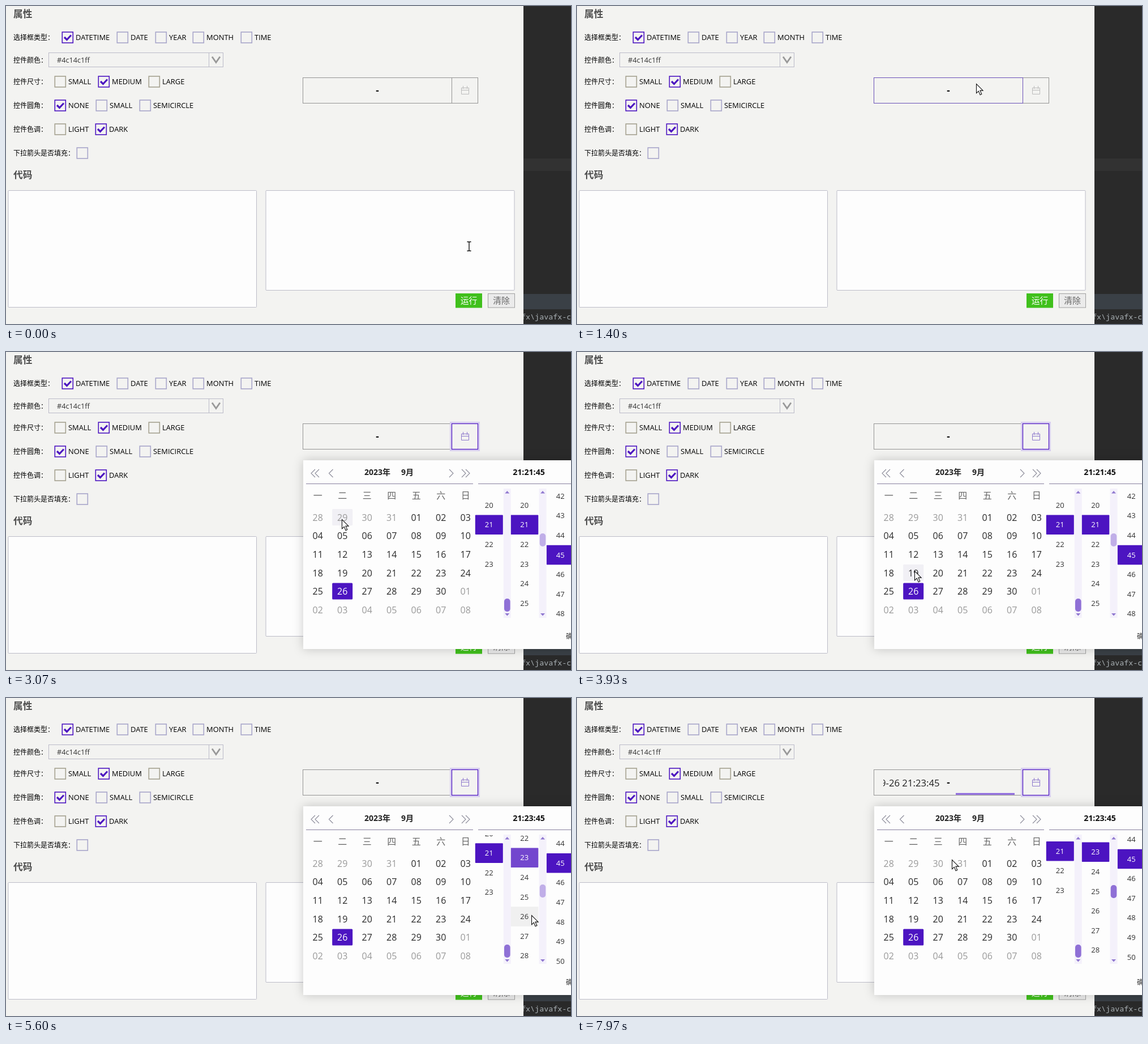
An HTML page that plays this animation: 998x561 px, repeating every 8000 ms.

```html
<!DOCTYPE html>
<html lang="zh-CN">
<head>
<meta charset="utf-8">
<style>
html, body { margin: 0; height: 100%; overflow: hidden; background: #f3f3f1 }
svg { display: block; width: 100%; height: 100% }
text { font-family: "Open Sans", "Noto Sans CJK SC", "Noto Sans CJK", sans-serif; white-space: pre }
.mono { font-family: "Noto Sans Mono", monospace }
.line { fill: none; stroke-linejoin: miter }
#shadow { filter: drop-shadow(0 0 9px #0003) }
</style>
</head>
<body>
<svg id="stage" viewBox="0 0 998 561"></svg>
<script>
const PURPLE = '#4c14c1', LAVENDER = '#a8a6ca', OLIVE = '#a5a290', ROW = 34.6;

const rect = (x, y, w, h, fill, more = '') =>
  `<rect x="${x}" y="${y}" width="${w}" height="${h}" fill="${fill}" ${more}/>`;
const box = (x, y, w, h, stroke, width = 1, more = '') =>
  rect(x, y, w, h, 'none', `stroke="${stroke}" stroke-width="${width}" ${more}`);
// y is the visual middle of the line
const text = (x, y, s, size, fill = '#000', more = '') =>
  `<text x="${x}" y="${y + size * .36}" font-size="${size}" fill="${fill}" ${more}>${s}</text>`;
const line = (d, stroke, width = 1, more = '') =>
  `<path class="line" d="${d}" stroke="${stroke}" stroke-width="${width}" ${more}/>`;
const mid = 'text-anchor="middle"', bold = 'font-weight="700"';

function check(x, y, label, on, color = LAVENDER) {
  return box(x + 1.3, y + 1, 19, 19, on ? PURPLE : color, 1.6) +
    (on ? line(`M${x + 5} ${y + 10}l4.5 4.5l7.5 -8`, PURPLE, 3.2) : '') +
    text(x + 25, y + 10.5, label, 12.9);
}

function form() {
  return rect(0, 0, 998, 561, '#f3f3f1') +
    text(13, 14, '属性', 16.7, '#4d4d4d', bold) +
    text(13, 298, '代码', 16.7, '#4d4d4d', bold) +
    [['选择框类型：', 56], ['控件颜色：', 95.5], ['控件尺寸：', 134], ['控件圆角：', 176], ['控件色调：', 218], ['下拉箭头是否填充：', 260]]
      .map(([s, y]) => text(13, y, s, 12)).join('') +
    check(98, 45, 'DATETIME', true) + check(195, 45, 'DATE') + check(263, 45, 'YEAR') +
    check(329, 45, 'MONTH') + check(414, 45, 'TIME') +
    box(75.5, 82.5, 308, 25, '#bbbac8') + line('M358.5 82V107', '#bbbac8') +
    text(90, 95, '#4c14c1ff', 12.7, '#333') + line('M364 89.5L371 99.5L378 89.5', '#999', 2.8) +
    check(85, 123, 'SMALL', false, OLIVE) + check(162, 123, 'MEDIUM', true) + check(251, 123, 'LARGE', false, OLIVE) +
    check(85, 165, 'NONE', true) + check(158, 165, 'SMALL') + check(235, 165, 'SEMICIRCLE') +
    check(85, 207, 'LIGHT', false, OLIVE) + check(157, 207, 'DARK', true) + check(124, 249, '') +
    box(4, 325.5, 438.5, 206, '#bcbcc8', 1, 'style="fill:#fdfdfd" rx="1"') +
    box(459, 325.5, 439, 176, '#bcbcc8', 1, 'style="fill:#fdfdfd" rx="1"') +
    rect(794, 507, 47, 25.5, '#40c01c') + text(817.5, 520, '运行', 14.8, '#fff', mid) +
    box(851.5, 507.5, 47, 24.5, '#a0a0a0', 1, 'style="fill:#ebebeb"') + text(875, 520, '清除', 14.8, '#666', mid) +
    rect(914, 0, 84, 561, '#2a2a2a') + rect(914, 269, 84, 22, '#323232') + rect(914, 508, 84, 27, '#3a4046') +
    `<g clip-path="url(#side)">${text(910, 548, 'fx\\javafx-c', 13.4, '#a9b0b4', 'class="mono"')}</g>`;
}

function field() {
  return box(524.5, 126.5, 309, 45, '#949494') + line('M787.5 126V172', '#949494') +
    box(524.5, 126.5, 263, 45, '#6a50b8', 1, 'id="hot"') +
    box(786, 125, 49, 48, '#d8cef0', 4, 'id="halo"') +
    box(787.5, 126.5, 46, 45, PURPLE, 1.2, 'id="focus"') +
    line('M804.5 144.5H817.5V155.5H804.5ZM804 148.5H818M807.5 141V146M814.5 141V146', '#bbb', 1, 'id="icon"') +
    text(656, 149, '-', 17, '#111', mid + ' ' + bold) +
    `<g id="result"><g clip-path="url(#entry)">${text(640.5, 149.5, '2023-09-26 21:23:45', 16.7, '#222', 'text-anchor="end"')}</g>` +
    rect(669, 167.7, 104, 3, '#8a64dc', 'id="under"') + '</g>';
}

const colX = c => 550.7 + 43.5 * c, rowY = r => 292 + 32.6 * r;

function calendar() {
  let s = '';
  [...'一二三四五六日'].forEach((d, c) => s += text(colX(c), 253, d, 16, '#666', mid));
  for (let i = 0; i < 42; i++) {
    const n = i - 3, here = n > 0 && n < 31, day = n < 1 ? n + 31 : here ? n : n - 30;
    const x = colX(i % 7), y = rowY(Math.floor(i / 7));
    if (n === 26) s += rect(x - 18, y - 15, 36, 29, PURPLE, 'rx="1.5"');
    s += text(x, y, String(day).padStart(2, '0'), 16, n === 26 ? '#fff' : here ? '#2a2a2a' : '#999', mid);
  }
  return s;
}

// A list of times whose entry `sel` starts out centred on y
function column(id, x, y, sel, from, to) {
  let s = rect(x - 24.5, y - 17.3, 49, ROW, '#f0f0f0', `id="${id}hover" visibility="hidden"`);
  s += rect(x - 24.5, y - 17.3, 49, ROW, PURPLE, `id="${id}sel" rx="1"`);
  for (let n = from; n <= to; n++)
    s += text(x, y + (n - sel) * ROW, n, 13, n === sel ? '#fff' : '#333', `${mid} id="${id}${n}"`);
  return `<g clip-path="url(#lists)"><g id="${id}">${s}</g></g>`;
}

const scrollbar = (id, x, y, fill) =>
  rect(x - 6.5, 241, 13, 228, '#f4f1fb') +
  `<path d="M${x - 4} 249.5h8l-4 -4.5z" fill="#9078d0"/><path id="${id}down" d="M${x - 4} 461h8l-4 4.5z" fill="#9078d0"/>` +
  rect(x - 5.3, y, 10.6, 23, fill, `rx="5" id="${id}"`);

const chevron = (x, dir) => `M${x} 207l${-7 * dir} 7l${7 * dir} 7`;

function popup() {
  return rect(525, 191, 560, 333, '#fdfdfd', 'id="shadow"') +
    line(chevron(546, 1) + chevron(553, 1) + chevron(577.5, 1) + chevron(783, -1) + chevron(805, -1) + chevron(812, -1), '#8a8a98', 1.1) +
    text(633, 212, '2023年', 14, '#222', bold) + text(698, 212, '9月', 14, '#222', bold) +
    text(923.5, 212, '21:21:45', 14.2, '#111', `${mid} ${bold} id="clock"`) +
    line('M530 232.5H825M834 232.5H998', '#88809f') +
    rect(0, 0, 36, 29, '#f1f0f5', 'id="cell" rx="1.5"') + calendar() +
    column('hour', 853.3, 304.8, 21, 20, 23) + column('minute', 915.8, 304.8, 21, 20, 30) +
    column('second', 979.3, 358, 45, 41, 52) +
    scrollbar('hourbar', 885.3, 435, '#8f70d6') + scrollbar('minbar', 948, 320, '#c0aee8') +
    text(989, 502, '确认', 12, '#333');
}

const stage = document.getElementById('stage');
stage.innerHTML =
  `<defs><clipPath id="side">${rect(914, 0, 84, 561, '#000')}</clipPath>` +
  `<clipPath id="entry">${rect(541, 127, 100, 44, '#000')}</clipPath>` +
  `<clipPath id="lists">${rect(826, 242, 172, 227, '#000')}</clipPath></defs>` +
  form() + field() + `<g id="popup">${popup()}</g>` +
  '<path id="arrow" d="M0 0V16.2L3.8 12.6L6.6 19.2L9.3 18L6.5 11.6H11.6Z" fill="#fff" stroke="#111" stroke-width="1.1"/>' +
  line('M-3.5 -8H-1L0 -7L1 -8H3.5M0 -7V7M-3.5 8H-1L0 7L1 8H3.5', '#111', 1.4, 'id="beam"');

const $ = id => document.getElementById(id);
const set = (id, attrs) => { for (const k in attrs) $(id).setAttribute(k, attrs[k]); };
const show = (id, on) => set(id, { visibility: on ? 'visible' : 'hidden' });
const ramp = (t, start, length) => Math.min(1, Math.max(0, (t - start) / length));
const within = (t, a, b) => t >= a && t < b;

const path = [
  [0, 818, 424], [60, 818, 424], [500, 560, 250], [830, 188, 42], [900, 188, 42], [1400, 705, 137],
  [1650, 812, 148], [2350, 812, 148], [2680, 806, 206], [2900, 806, 206], [3070, 593, 295],
  [3400, 548, 438], [3700, 590, 293], [3930, 596, 386], [4100, 596, 386], [4450, 880, 430],
  [4630, 885, 365], [4900, 890, 367], [5130, 928, 383], [5650, 928, 383], [6150, 986, 505],
  [6570, 986, 505], [6930, 917, 452], [7250, 850, 380], [7450, 960, 470], [7750, 760, 190], [7970, 662, 285], [8000, 662, 285]
];

function cursorAt(t) {
  const i = path.findIndex(p => p[0] > t), a = path[i - 1], b = path[i];
  const k = ramp(t, a[0], b[0] - a[0]), e = k * k * (3 - 2 * k);
  return [a[1] + (b[1] - a[1]) * e, a[2] + (b[2] - a[2]) * e];
}

function draw(t) {
  const [x, y] = cursorAt(t);
  const typing = t < 1000 && x > 459 && x < 898 && y > 325 && y < 501;
  show('arrow', !typing);
  show('beam', typing);
  set('arrow', { transform: `translate(${x + .5} ${y + .5})` });
  set('beam', { transform: `translate(${x} ${y})` });

  show('hot', t < 2000 && within(x, 524, 788) && within(y, 126, 172));
  show('halo', t > 2000);
  show('focus', t > 1600);
  set('icon', { stroke: t > 1600 ? '#8d78cc' : '#bbb' });
  show('result', t >= 6570);
  const under = 104 * ramp(t, 6570, 200);
  set('under', { x: 721 - under / 2, width: under });
  set('popup', { opacity: ramp(t, 2050, 400) });

  const c = Math.round((x - colX(0)) / 43.5), r = Math.round((y - 292) / 32.6);
  show('cell', t > 2700 && within(c, 0, 7) && within(r, 0, 6) &&
    Math.abs(x - colX(c)) < 18 && Math.abs(y - rowY(r)) < 14.7);
  set('cell', { x: colX(c) - 18, y: rowY(r) - 15 });

  const picked = t >= 5430, roll = 1 - (1 - ramp(t, 5430, 317)) ** 3;
  const scroll = 102.3 * roll;
  $('clock').textContent = picked ? '21:23:45' : '21:21:45';
  set('hour', { transform: `translate(0 ${-34.6 * roll})` });
  set('minute', { transform: `translate(0 ${-scroll})` });
  set('second', { transform: `translate(0 ${-74 * roll})` });
  set('minutesel', { y: 287.5 + (picked ? 2 * ROW : 0), opacity: picked ? ramp(t, 5430, 220) : 1 });
  set('minute21', { fill: picked ? '#333' : '#fff' });
  set('minute23', { fill: picked ? '#fff' : '#333' });
  const over = Math.round((y + scroll - 304.8) / ROW);
  show('minutehover', within(t, 4950, 6300) && within(x, 891, 941) && within(y, 242, 469));
  set('minutehover', { y: 287.5 + over * ROW });

  const drag = within(t, 6780, 7100);
  set('hourbar', { fill: within(t, 4440, 4990) ? '#5a28c6' : '#8f70d6' });
  set('minbar', { y: 320 + 10 * roll, fill: drag ? '#5a28c6' : t < 6780 ? '#c0aee8' : '#8f70d6' });
  set('minbardown', { fill: drag ? PURPLE : '#9078d0' });
}

function tick(now) {
  draw(now % 8000);
  requestAnimationFrame(tick);
}
draw(0);
requestAnimationFrame(tick);
</script>
</body>
</html>
```
